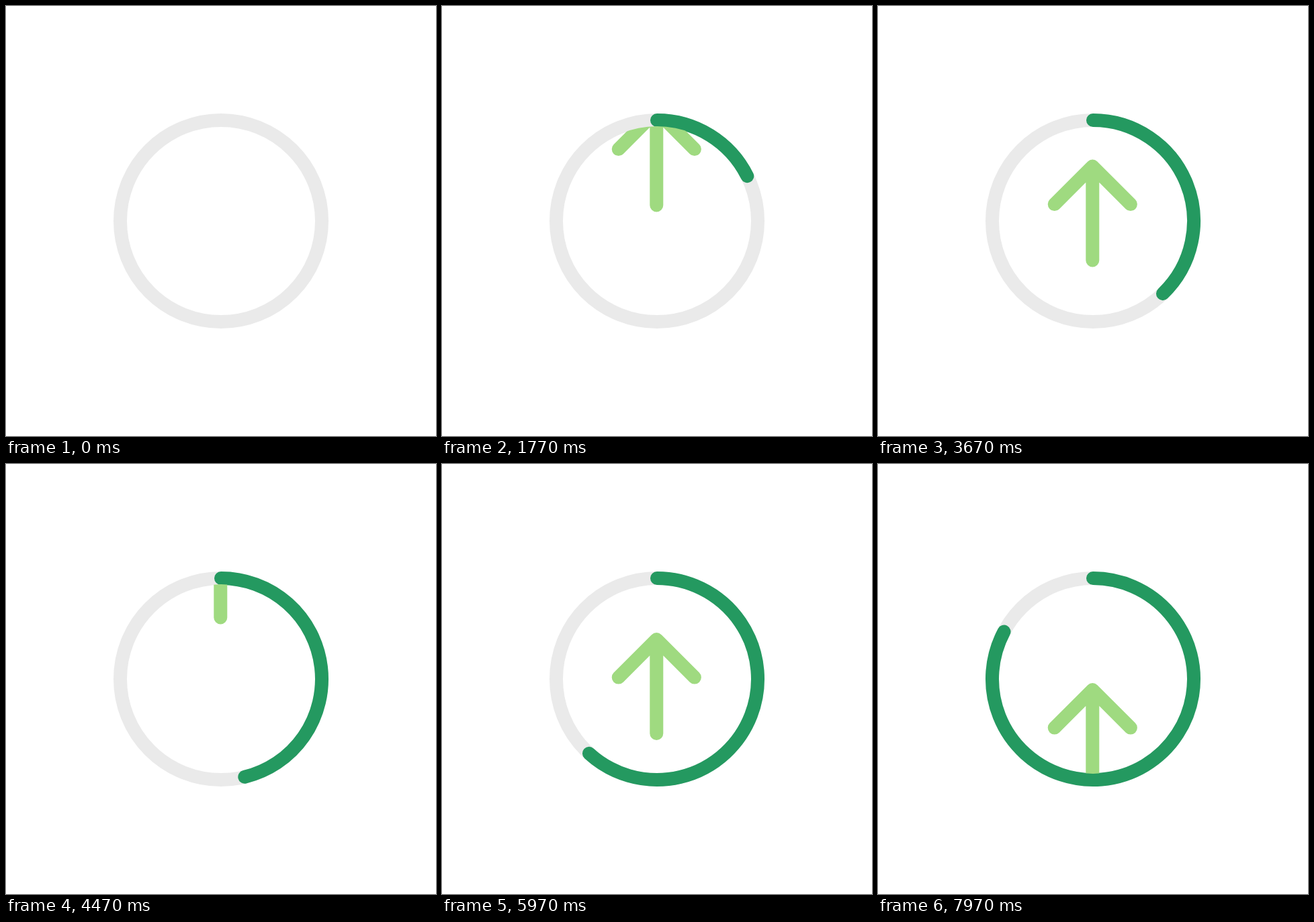
Recreate the animation shown at these times as an HTML page. Size 640x640 px, loop 8 s.

```html
<!DOCTYPE html>
<html lang="en">
<head>
<meta charset="utf-8">
<title>Upload progress</title>
<style>
  html, body { margin: 0; height: 100%; overflow: hidden; background: #fff; }
  svg { display: block; width: 100vw; height: 100vh; }
  circle, path { fill: none; stroke-width: 20; stroke-linecap: round; stroke-linejoin: round; }
  .track { stroke: #eaeaea; }
  #arc { stroke: #249960; }
  #arrow { stroke: #9fda80; }
</style>
</head>
<body>
<svg viewBox="0 0 640 640">
  <clipPath id="inside"><circle cx="320" cy="320" r="141"/></clipPath>
  <circle class="track" cx="320" cy="320" r="150"/>
  <path id="arc"/>
  <g clip-path="url(#inside)">
    <path id="arrow" d="M0 0V-140M-56.6 -83.4L0 -140L56.6 -83.4"/>
  </g>
</svg>
<script>
  const LOOP = 8000;
  const START = 130;
  const BLOCK = 200;
  const TICKS = [0, 40, 70, 100, 140];   // uneven rhythm of five steps per block
  const RISE = 7.5;
  const CYCLE = 60;

  const arc = document.getElementById('arc');
  const arrow = document.getElementById('arrow');

  function stepAt(time) {
    if (time < START) return 0;
    const t = time - START;
    const within = t % BLOCK;
    return Math.floor(t / BLOCK) * TICKS.length + TICKS.filter(tick => tick <= within).length;
  }

  function arcPath(angle) {
    const x = 320 + 150 * Math.sin(angle);
    const y = 320 - 150 * Math.cos(angle);
    return `M320 170A150 150 0 ${angle > Math.PI ? 1 : 0} 1 ${x} ${y}`;
  }

  // The first rise begins one step lower than the later ones.
  function arrowFoot(step) {
    const top = step < CYCLE ? 611.5 : 603.5;
    return top - RISE * (step % CYCLE);
  }

  function draw(time) {
    const step = stepAt(time);
    arc.setAttribute('d', step ? arcPath(step / 238 * 2 * Math.PI) : '');
    arrow.setAttribute('transform', `translate(319.3 ${arrowFoot(step)})`);
  }

  const origin = performance.now();
  function frame() {
    draw((performance.now() - origin) % LOOP);
    requestAnimationFrame(frame);
  }
  frame();
</script>
</body>
</html>
```
